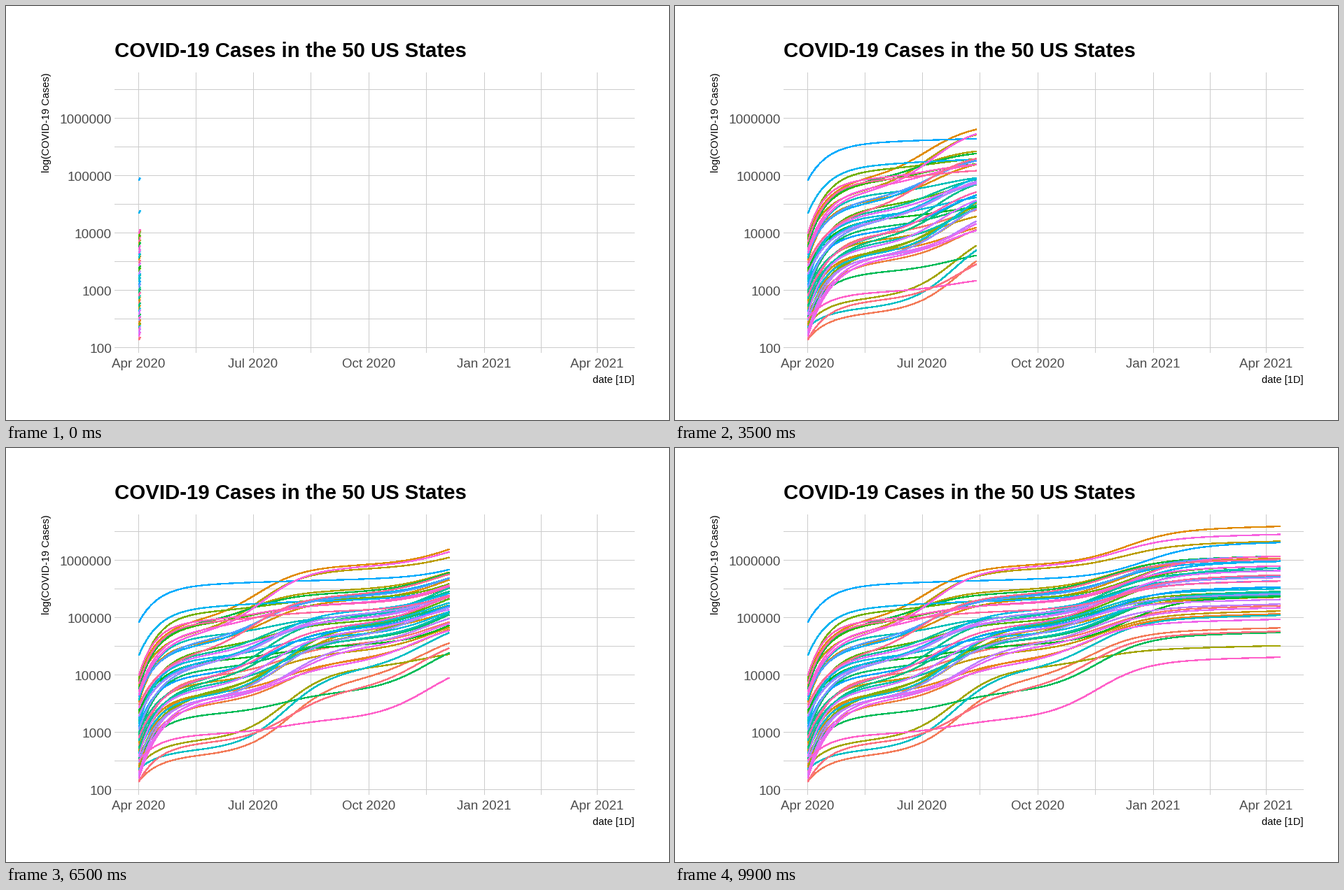
A matplotlib script that plays this animation: 947x592 px, repeating every 10 s.

```python
import numpy as np
import matplotlib.pyplot as plt
from matplotlib.animation import FuncAnimation
from matplotlib.collections import LineCollection

W, H, DPI = 947, 592, 100
PX = 72 / DPI
FRAMES, INTERVAL = 100, 100
LAST_DAY, STATES = 376, 50
X0, PX_PER_DAY = 189.8, 1.7945
Y100, PX_PER_DECADE = 488.6, 82.05
YEAR_CREEP = .2

# Curves that stand apart, by place in the hue order:
# starting level and spring, summer and winter gains, in decades
LANDMARKS = {
    31: (4.92, .64, .01, .54),
    29: (4.34, .83, .04, .57),
    4: (3.97, .95, .90, .57),
    42: (3.64, 1.05, 1.10, .46),
    8: (3.89, .82, 1.04, .38),
    10: (2.41, .42, 1.20, .28),
    25: (2.36, .30, 1.33, .85),
    1: (2.15, .42, 1.25, .80),
    44: (2.51, .43, .20, .97),
    49: (2.14, .65, .85, .92),
    18: (2.54, .75, .32, .93),
}


def hue_color(deg, lum=65, chroma=100):
    """Polar LUV to sRGB."""
    h = np.radians(deg)
    u = chroma * np.cos(h) / (13 * lum) + .1978
    v = chroma * np.sin(h) / (13 * lum) + .4683
    y = ((lum + 16) / 116) ** 3
    x = 9 * y * u / (4 * v)
    z = -x / 3 - 5 * y + 3 * y / v
    rgb = np.array([[3.2405, -1.5371, -.4985],
                    [-.9693, 1.8760, .0416],
                    [.0556, -.2040, 1.0572]]) @ (x, y, z)
    rgb = np.clip(rgb, 0, 1)
    return np.where(rgb > .0031308, 1.055 * rgb ** (1 / 2.4) - .055, 12.92 * rgb)


def surge(days, middle, width):
    return 1 / (1 + np.exp((middle - days) / width))


def level(days, start, spring, summer, winter, shift=0, pace=16):
    """Log10 of cases: a fast spring rise, then a summer and a winter wave."""
    return (start + YEAR_CREEP * days / LAST_DAY
            + spring * (1 - np.exp(-days / pace))
            + summer * surge(days, 150 - 14 * start + shift, 18)
            + winter * surge(days, 190 + 16 * start + shift, 20))


def random_state(rng, start):
    end = np.clip(5.1 + .55 * (start - 2.15) + rng.normal(0, .15), 4.97, 6.07)
    spring = rng.uniform(.85, 1.15) + .25 * max(0, 3 - start)
    winter = rng.uniform(.45, .75)
    summer = max(.08, end - start - spring - winter - YEAR_CREEP)
    return start, spring, summer, winter, rng.uniform(-10, 10), rng.uniform(13, 20)


def build_curves():
    rng = np.random.default_rng(19)
    days = np.arange(LAST_DAY + 1)
    x = X0 + PX_PER_DAY * days
    starts = iter(rng.permutation(np.linspace(2.2, 3.99, STATES - len(LANDMARKS))))
    curves = []
    for i in range(STATES):
        shape = LANDMARKS[i] if i in LANDMARKS else random_state(rng, next(starts))
        y = Y100 - PX_PER_DECADE * (level(days, *shape) - 2)
        curves.append(np.column_stack([x, y]))
    return np.array(curves)


fig = plt.figure(figsize=(W / DPI, H / DPI), dpi=DPI, facecolor="white")
ax = fig.add_axes((0, 0, 1, 1))
ax.set(xlim=(0, W), ylim=(H, 0))
ax.axis("off")


def label(x, y, text, size, color="black", **kw):
    ax.text(x, y, text, fontsize=size * PX, color=color, family="Liberation Sans",
            va="baseline", **kw)


GREY = "#4d4d4d"
# Month starts and the points halfway between them, on pixel centres
month_days = np.array([0, 91, 183, 275, 365])
grid_days = np.sort(np.r_[month_days, (month_days[:-1] + month_days[1:]) / 2])
x_lines = np.floor(X0 + PX_PER_DAY * grid_days) + .5
y_lines = np.floor(Y100 - PX_PER_DECADE * np.arange(10) / 2) + .5
grid = dict(color="#cccccc", lw=PX, zorder=1, snap=False, solid_capstyle="butt")
for gx in x_lines:
    ax.plot((gx, gx), (95, 496), **grid)
for gy in y_lines:
    ax.plot((155, 898), (gy, gy), **grid)

months = ("Apr 2020", "Jul 2020", "Oct 2020", "Jan 2021", "Apr 2021")
for gx, month in zip(x_lines[::2], months):
    label(gx - .5, 517, month, 18.75, GREY, ha="center")
for k, gy in enumerate(y_lines[::2]):
    label(151, gy + 7, str(10 ** (k + 2)), 19, GREY, ha="right")

label(155, 73, "COVID-19 Cases in the 50 US States", 29.4, weight="bold")
label(898, 539, "date [1D]", 14.67, ha="right")
label(62, 95, "log(COVID-19 Cases)", 14.67, ha="right", rotation=90,
      rotation_mode="anchor")

curves = build_curves()
colors = [hue_color(15 + 360 * i / STATES) for i in range(STATES)]
lines = LineCollection([], colors=colors, linewidths=1.3 * PX, antialiaseds=False, zorder=2)
ax.add_collection(lines, autolim=False)


def update(frame):
    day = round(1 + (LAST_DAY - 1) * frame / (FRAMES - 1))
    lines.set_segments(curves[:, :day + 1])
    return [lines]


anim = FuncAnimation(fig, update, frames=FRAMES, interval=INTERVAL, repeat=True,
                     repeat_delay=0)
plt.show()
```
